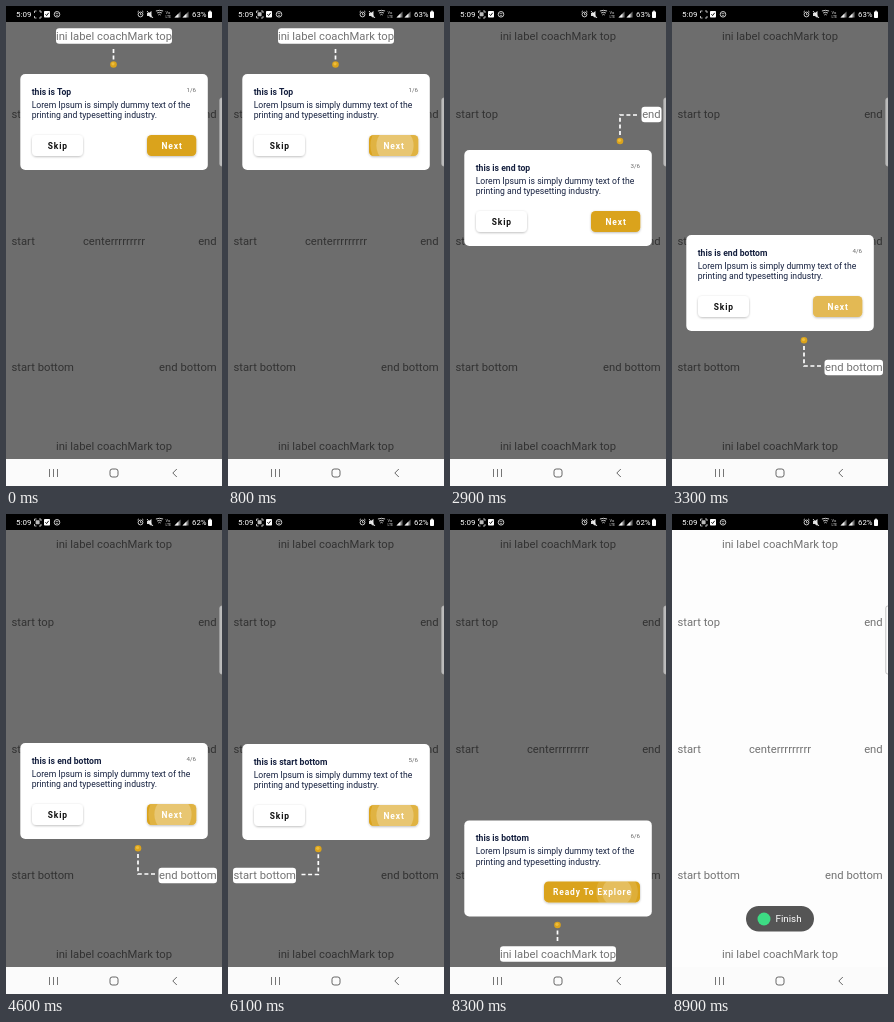
Animation, 216 px wide and 480 px high, one loop 9000 ms. Source, as an HTML page:

```html
<!DOCTYPE html>
<html lang="en">
<head>
<meta charset="utf-8">
<title>Coach mark walkthrough</title>
<style>
html, body { margin: 0; width: 100%; height: 100%; overflow: hidden; background: #fff; }
svg { display: block; width: 216px; height: 480px; font-family: Roboto, sans-serif; }
</style>
</head>
<body>
<svg id="stage" viewBox="0 0 216 480"></svg>
<script>
const LOOP = 9000, GOLD = '#daa31c', GREY = '#737373', NAVY = '#15203f';
const stage = document.getElementById('stage');
const clamp = v => Math.max(0, Math.min(1, v));

const rect = (x, y, w, h, r, fill, more = '') =>
  `<rect x="${x}" y="${y}" width="${w}" height="${h}" rx="${r}" fill="${fill}" ${more}/>`;
const circle = (x, y, r, fill, more = '') =>
  `<circle cx="${x}" cy="${y}" r="${r}" fill="${fill}" ${more}/>`;
const line = (d, stroke, width, more = '') =>
  `<path d="${d}" fill="none" stroke="${stroke}" stroke-width="${width}" ${more}/>`;
const text = (x, y, s, size, fill, more = '') =>
  `<text x="${x}" y="${y}" font-size="${size}" fill="${fill}" ${more}>${s}</text>`;

// Page labels: text, x, centre y, anchor
const labels = [
  ['ini label coachMark top', 108, 30, 'middle'],
  ['start top', 5.5, 108.5, 'start'],
  ['end', 210.7, 108.5, 'end'],
  ['start', 5.5, 235, 'start'],
  ['centerrrrrrrrr', 108, 235, 'middle'],
  ['end', 210.7, 235, 'end'],
  ['start bottom', 5.5, 361.5, 'start'],
  ['end bottom', 210.7, 361.5, 'end'],
  ['ini label coachMark top', 108, 440, 'middle']
];
const label = ([s, x, y, anchor]) => text(x, y + 3.9, s, 11.25, GREY, `text-anchor="${anchor}"`);

// box: x, width of the lit label; dot: end of the connector
const steps = [
  { title: 'this is Top', label: 0, box: [50, 116], card: 68, path: 'M107.5 43V56', dot: [107.5, 58.5], press: 700, leave: 900 },
  { title: 'this is start top', label: 1, box: [5, 43], card: 144, path: 'M53.5 109H70.5V131', dot: [70.5, 135], press: 2000, leave: 2200 },
  { title: 'this is end top', label: 2, box: [191.5, 20], card: 144, path: 'M187 109H170V131', dot: [170, 135], press: 2900, leave: 3200 },
  { title: 'this is end bottom', label: 7, box: [152.5, 58.5], card: 229, path: 'M149 360H132V338', dot: [132, 334.3], press: 4500, leave: 4700 },
  { title: 'this is start bottom', label: 6, box: [5, 63], card: 230, path: 'M73.5 360.5H90.3V338', dot: [90.3, 335], press: 6000, leave: 6200 },
  { title: 'this is bottom', label: 8, box: [50, 116], card: 306.4, path: 'M107.5 427V413', dot: [107.5, 411], press: 8230, leave: 8500 }
];

// Moments at which the recording icon blinks
const blinks = [300, 1000, 1500, 2000, 2500, 3000, 3500, 4000, 4500, 5500, 6000, 6500, 7000, 7500, 8000, 8500, 8900];

function statusBar(t) {
  const lit = blinks.filter(b => b <= t).length % 2;
  const wifi = [2, 4, 6].map(r => line(`M${153.5 - r * .6} ${11 - r}Q153.5 ${9.6 - r} ${153.5 + r * .6} ${11 - r}`, '#ddd', .9)).join('');
  const signal = x => `<path d="M${x} 11.5h6v-6z" fill="#777"/><path d="M${x} 11.5h4v-4z" fill="#eee"/>`;
  return rect(0, 0, 216, 16, 0, '#000') +
    text(10, 11, '5:09', 8, '#fff') +
    line('M28.5 7V5H30.5M33 5H35V7M35 10V12H33M30.5 12H28.5V10', '#ddd', .8) +
    (lit ? rect(29.6, 6.2, 4, 4, .6, '#bbb') : '') +
    rect(38, 5, 6, 6.5, .8, '#fff') + line('M39.4 8.2L40.6 9.6L42.7 6.8', '#000', .9) +
    circle(51, 8.3, 2.8, 'none', 'stroke="#ddd" stroke-width=".9"') +
    line('M49.6 7.4H52.4M49.8 9Q51 10.2 52.2 9', '#ddd', .7) +
    circle(134.5, 8.5, 2.4, 'none', 'stroke="#ddd" stroke-width=".9"') +
    line('M131.5 6L133 4.8M136 4.8L137.5 6M134.5 7V8.7H135.7', '#ddd', .8) +
    '<path d="M141 7h1.8L145.5 5v7L142.8 10H141z" fill="#ddd"/>' + line('M141 5L147 12', '#fff', .8) +
    wifi + text(159.5, 8.1, 'Vo', 4, '#ddd') + text(159.5, 11.7, 'LTE', 3.6, '#ddd') +
    signal(168.5) + signal(176.5) +
    text(186, 11, t < 4500 ? '63%' : '62%', 7.8, '#fff') +
    rect(202, 5.5, 4, 6.5, .8, '#fff') + rect(203, 4.7, 2, 1, 0, '#fff');
}

const navBar = rect(0, 453, 216, 27, 0, '#fbfbfb') +
  line('M43.5 463V471M47.5 463V471M51.5 463V471', '#666', .9) +
  rect(104, 463, 8, 8, 2.2, 'none', 'stroke="#666" stroke-width="1"') +
  line('M170.8 463L166.8 467L170.8 471', '#666', 1);

const button = (x, y, w, s, fill, ink, ripple = '') =>
  rect(x, y, w, 21, 4.5, fill, 'filter="url(#soft)"') + ripple +
  text(x + w / 2 + .4, y + 13.5, s, 8.44, ink, 'font-weight="600" letter-spacing=".88" text-anchor="middle"');

// Ripple of the current press, or the fading one carried over from the previous card
function ripple(t, i, cx, cy) {
  const now = steps[i], last = steps[i - 1];
  const src = t >= now.press ? now : last;
  if (!src) return '';
  const age = t - src.press;
  const fade = clamp(1 - (t - src.leave) / 300) * clamp(age / 90);
  if (fade <= 0) return '';
  const r = 10 + age * .125;
  return `<g clip-path="url(#press)" opacity="${fade}">` +
    circle(cx, cy, r + 2, '#fff', 'fill-opacity=".17"') +
    circle(cx, cy, r - 4, '#fff', 'fill-opacity=".25"') + '</g>';
}

function coach(t, i) {
  const s = steps[i], y = s.card, final = i === 5;
  const [bx, bw] = s.box, by = y + 61;
  const x = final ? 94 : 141, w = final ? 96 : 49.3;
  return rect(0, 16, 216, 437, 0, '#000', 'opacity=".57"') +
    rect(bx, labels[s.label][2] - 7.8, bw, 15.6, 3.2, '#fff') + label(labels[s.label]) +
    line(s.path, '#fff', 1.7, 'stroke-dasharray="4 2.6"') +
    circle(...s.dot, 3.3, GOLD) + circle(s.dot[0] - .5, s.dot[1] - .7, 1.6, '#edbd3c') +
    rect(14.3, y, 187.5, 96, 5, '#fff') +
    text(25.7, y + 20.6, s.title, 8.65, NAVY, 'font-weight="700"') +
    text(190, y + 18, `${i + 1}/6`, 6.2, '#666', 'text-anchor="end"') +
    text(25.7, y + 34, 'Lorem Ipsum is simply dummy text of the', 8.65, NAVY) +
    text(25.7, y + 44.1, 'printing and typesetting industry.', 8.65, NAVY) +
    (final ? '' : button(26, by, 51, 'Skip', '#fff', '#111')) +
    `<clipPath id="press">${rect(x, by, w, 21, 4.5, '#000')}</clipPath>` +
    button(x, by, w, final ? 'Ready To Explore' : 'Next', GOLD, '#fff', ripple(t, i, 167, by + 10.5));
}

const toast = rect(74, 392, 68, 25.5, 12.75, '#555') +
  circle(92, 405, 6.5, '#3ddc84') + text(103.5, 408.4, 'Finish', 9.8, '#fff');

const defs = `<defs><filter id="soft" x="-20%" y="-30%" width="140%" height="170%">
  <feDropShadow dx="0" dy=".8" stdDeviation=".8" flood-opacity=".28"/></filter></defs>`;

function draw(now) {
  const t = now % LOOP;
  const next = steps.findIndex(s => t < s.leave);
  const i = next < 0 ? 5 : next;
  const shade = clamp((8700 - t) / 200);
  stage.innerHTML = defs + rect(0, 0, 216, 480, 0, '#fdfdfd') +
    labels.map(label).join('') +
    (shade ? `<g opacity="${shade}">${coach(t, i)}</g>` : '') +
    `<g opacity="${clamp((t - 8600) / 200)}">${toast}</g>` +
    rect(213.8, 92, 6, 68, 2, '#fff', 'fill-opacity=".55" stroke="#b5b5b5" stroke-width=".8"') +
    statusBar(t) + navBar;
  requestAnimationFrame(draw);
}
requestAnimationFrame(draw);
</script>
</body>
</html>
```
